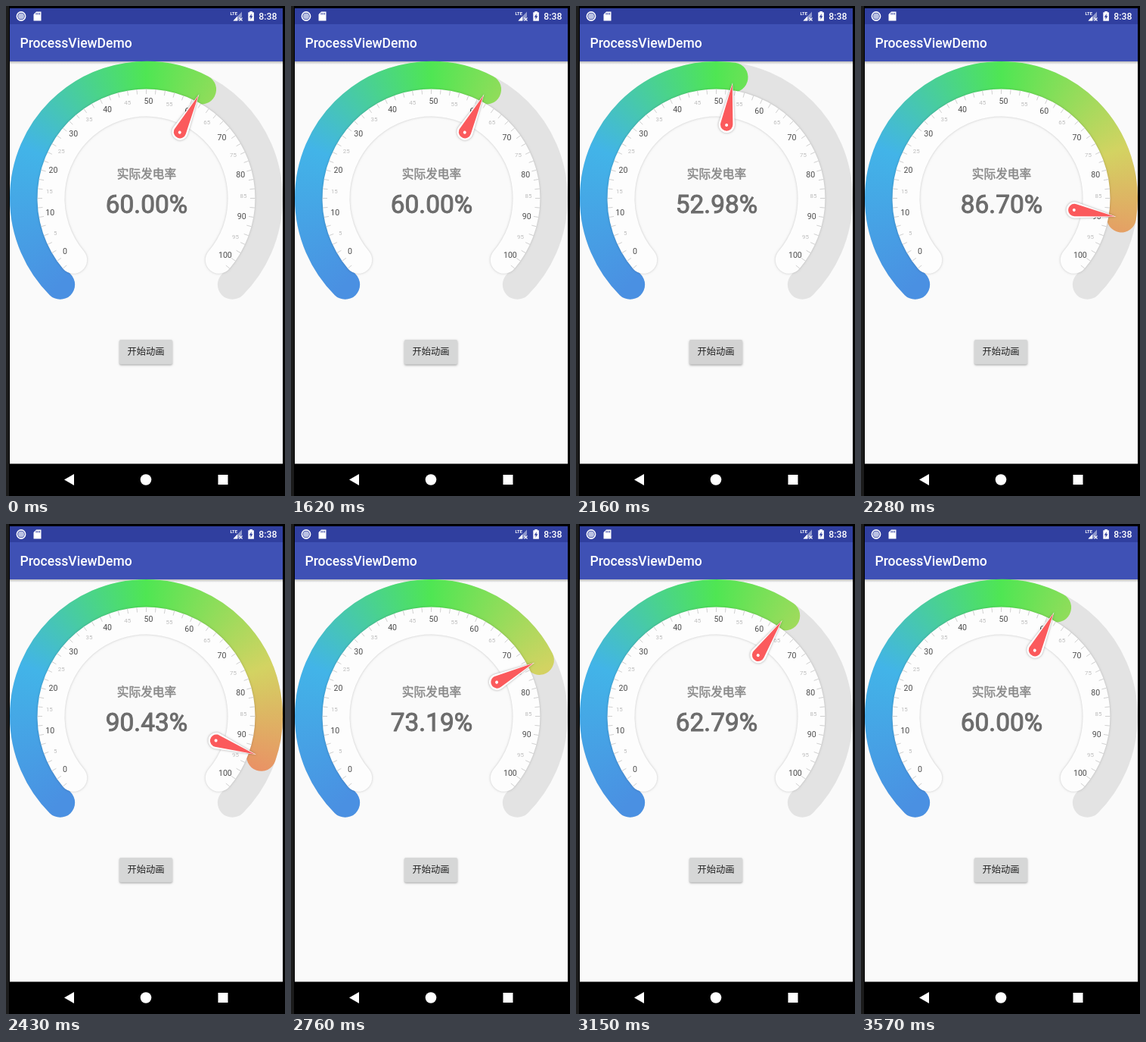
Animation of 369x646 px, one loop 4320 ms. Source, as an HTML page with a canvas:

```html
<!DOCTYPE html>
<html lang="zh-CN">
<head>
<meta charset="utf-8">
<title>Gauge</title>
<style>
html, body { margin: 0; width: 100%; height: 100%; overflow: hidden; background: #000; }
canvas { display: block; }
</style>
</head>
<body>
<canvas id="stage" width="369" height="646"></canvas>
<script>
const g = document.getElementById('stage').getContext('2d');
const LOOP = 4320, STEP = 30, PRESS = 1620, RUN = 1680, END = 3570;
const CX = 185.5, CY = 253.5, RAD = Math.PI / 180;
const ROBOTO = 'Roboto, sans-serif';
const CJK = '"Noto Sans CJK SC", "Noto Sans CJK", sans-serif';

// Fast-out, slow-in curve: bezier (0.4, 0, 0.2, 1)
const curveX = u => 1.2 * u * (1 - u) ** 2 + 0.6 * u * u * (1 - u) + u ** 3;
const curveY = u => 3 * u * u - 2 * u ** 3;

function solve(fn, v) {
  let lo = 0, hi = 1;
  for (let i = 0; i < 40; i++) {
    const mid = (lo + hi) / 2;
    if (fn(mid) < v) lo = mid; else hi = mid;
  }
  return (lo + hi) / 2;
}

// Clock pacing: [ms, eased progress]
const pace = [[1665, 0], [2160, 0.2649], [2430, 0.619625], [2760, 0.835125], [3150, 0.965125], [3570, 1]]
  .map(([ms, y]) => [ms, y === 0 || y === 1 ? y : curveX(solve(curveY, y))]);

function percent(t) {
  if (t < RUN || t >= END) return 60;
  let i = 1;
  while (t > pace[i][0]) i++;
  const [t0, x0] = pace[i - 1], [t1, x1] = pace[i];
  const f = curveY(solve(curveX, x0 + (x1 - x0) * (t - t0) / (t1 - t0)));
  return f < 0.5 ? 200 * f : 100 - 80 * (f - 0.5);
}

function rect(x, y, w, h, color) {
  g.fillStyle = color;
  g.fillRect(x, y, w, h);
}

function disc(x, y, r, color) {
  g.fillStyle = color;
  g.beginPath();
  g.arc(x, y, r, 0, 7);
  g.fill();
}

function poly(color, ...p) {
  g.fillStyle = color;
  g.beginPath();
  for (let i = 0; i < p.length; i += 2) g.lineTo(p[i], p[i + 1]);
  g.closePath();
  g.fill();
}

function text(s, x, y, font, color, align = 'center', embolden = 0) {
  g.font = font;
  g.fillStyle = g.strokeStyle = color;
  g.textAlign = align;
  g.fillText(s, x, y);
  if (embolden) {
    g.lineWidth = embolden;
    g.lineJoin = 'round';
    g.strokeText(s, x, y);
  }
}

function shadow(color, blur, dy = 0) {
  g.shadowColor = color;
  g.shadowBlur = blur;
  g.shadowOffsetY = dy;
}
const noShadow = () => shadow('transparent', 0);

function band(r, width, from, to, style) {
  g.strokeStyle = style;
  g.lineWidth = width;
  g.lineCap = 'round';
  g.beginPath();
  g.arc(CX, CY, r, from * RAD, to * RAD);
  g.stroke();
}

const rainbow = g.createConicGradient(135 * RAD, CX, CY);
[[0, '#4a90e2'], [0.1875, '#42b4e8'], [0.375, '#4fe653'], [0.5625, '#d3d362'],
 [0.75, '#f27866'], [0.87, '#f27866'], [0.88, '#4a90e2'], [1, '#4a90e2']]
  .forEach(([p, c]) => rainbow.addColorStop(p, c));

function statusBar() {
  rect(5, 3, 361, 21, '#303f9f');
  g.strokeStyle = '#fff';
  g.lineWidth = 1.6;
  g.beginPath();
  g.arc(20, 13.5, 5.6, 0, 7);
  g.stroke();
  disc(20, 13.5, 4, '#b9c0e2');
  poly('#fff', 40, 7.5, 46.5, 7.5, 46.5, 19.5, 36.5, 19.5, 36.5, 11);
  for (let i = 0; i < 3; i++) rect(39.5 + i * 2.2, 9, 1, 2.5, '#303f9f');
  text('LTE', 296.5, 12, '700 5.8px ' + ROBOTO, '#fff', 'left');
  poly('#8f98cc', 312, 7.5, 312, 14, 307, 19.5, 300.5, 19.5);
  poly('#fff', 306, 13.5, 306, 19.5, 300.5, 19.5);
  g.strokeStyle = '#fff';
  g.lineWidth = 1.1;
  g.beginPath();
  g.moveTo(308.5, 15.5); g.lineTo(312.5, 19.5);
  g.moveTo(312.5, 15.5); g.lineTo(308.5, 19.5);
  g.stroke();
  rect(322.3, 7, 3.6, 2, '#fff');
  rect(320.3, 8.3, 7.6, 11.4, '#fff');
  poly('#303f9f', 324.8, 10, 321.8, 14.7, 323.7, 14.7, 323.4, 18, 326.4, 13.3, 324.5, 13.3);
  text('8:38', 358.5, 18, '500 12.3px ' + ROBOTO, '#fff', 'right');
}

function navBar() {
  rect(5, 603.5, 361, 42.5, '#000');
  poly('#fff', 77, 624.5, 90, 617, 90, 632);
  disc(185, 624.5, 7.3, '#fff');
  rect(280.5, 618, 13, 13, '#fff');
}

function frame() {
  rect(0, 0, 369, 646, '#000');
  rect(0, 0, 4, 646, '#1b1b1b');
  rect(5, 24, 361, 580, '#fafafa');
  const fade = g.createLinearGradient(0, 73, 0, 77);
  fade.addColorStop(0, 'rgba(0,0,0,.25)');
  fade.addColorStop(1, 'rgba(0,0,0,0)');
  rect(5, 73, 361, 4, fade);
  statusBar();
  rect(5, 24, 361, 49, '#3f51b5');
  text('ProcessViewDemo', 18.5, 55, '500 17.56px ' + ROBOTO, '#fff', 'left');
  navBar();
}

function dial() {
  shadow('rgba(0,0,0,.22)', 3);
  band(126, 36, 139.8, 400.2, '#fdfdfd');
  noShadow();
  g.strokeStyle = '#c4c4c4';
  g.lineWidth = 0.8;
  g.lineCap = 'butt';
  g.beginPath();
  for (let a = 140; a <= 400; a += 5) {
    const c = Math.cos(a * RAD), s = Math.sin(a * RAD);
    g.moveTo(CX + 137.5 * c, CY + 137.5 * s);
    g.lineTo(CX + 144 * c, CY + 144 * s);
  }
  g.stroke();
  for (let v = 0; v <= 100; v += 5) {
    const a = (146.9 + 2.488 * v) * RAD, big = v % 10 === 0;
    const x = CX + 128.5 * Math.cos(a), y = CY + 128.5 * Math.sin(a);
    text(v, x, y + (big ? 3.8 : 2.9), (big ? 10.6 : 7.9) + 'px ' + ROBOTO, big ? '#4d4d4d' : '#bdbdbd');
  }
}

function drop(r, tip, color) {
  const a = Math.acos(r / tip);
  g.fillStyle = color;
  g.beginPath();
  g.arc(0, 0, r, a, 2 * Math.PI - a);
  g.lineTo(tip, 0);
  g.closePath();
  g.fill();
}

function needle(angle) {
  g.save();
  g.translate(CX, CY);
  g.rotate(angle * RAD);
  g.translate(98, 0);
  shadow('rgba(0,0,0,.35)', 3);
  drop(10.7, 56, '#fff');
  noShadow();
  drop(8.2, 54, '#fb5a5c');
  disc(-0.5, 0, 2, '#fff');
  g.restore();
}

function button(t) {
  const held = t >= PRESS && t < 2280;
  shadow('rgba(0,0,0,.35)', held ? 3 : 2.5, held ? 1.3 : 1);
  g.fillStyle = held && t > PRESS ? '#d3d3d3' : '#d6d7d7';
  g.beginPath();
  g.roundRect(150, 440, 70, 32.5, 2);
  g.fill();
  noShadow();
  text('开始动画', 185, 460.4, '12.3px ' + CJK, '#222');
}

function draw(t) {
  const p = percent(t), end = 135 + 2.7 * p;
  frame();
  band(161, 39, 135, 405, '#e3e3e3');
  band(161, 39, 135, end, rainbow);
  dial();
  needle(end);
  text('实际发电率', 186, 227, '15.7px ' + CJK, '#8a8a8a', 'center', 0.5);
  text(p.toFixed(2) + '%', 186, 273.2, '33.4px ' + ROBOTO, '#6c6c6c', 'center', 1);
  button(t);
}

const start = performance.now();
function tick() {
  const t = (performance.now() - start) % LOOP;
  draw(Math.floor(t / STEP) * STEP);
  requestAnimationFrame(tick);
}
tick();
</script>
</body>
</html>
```
